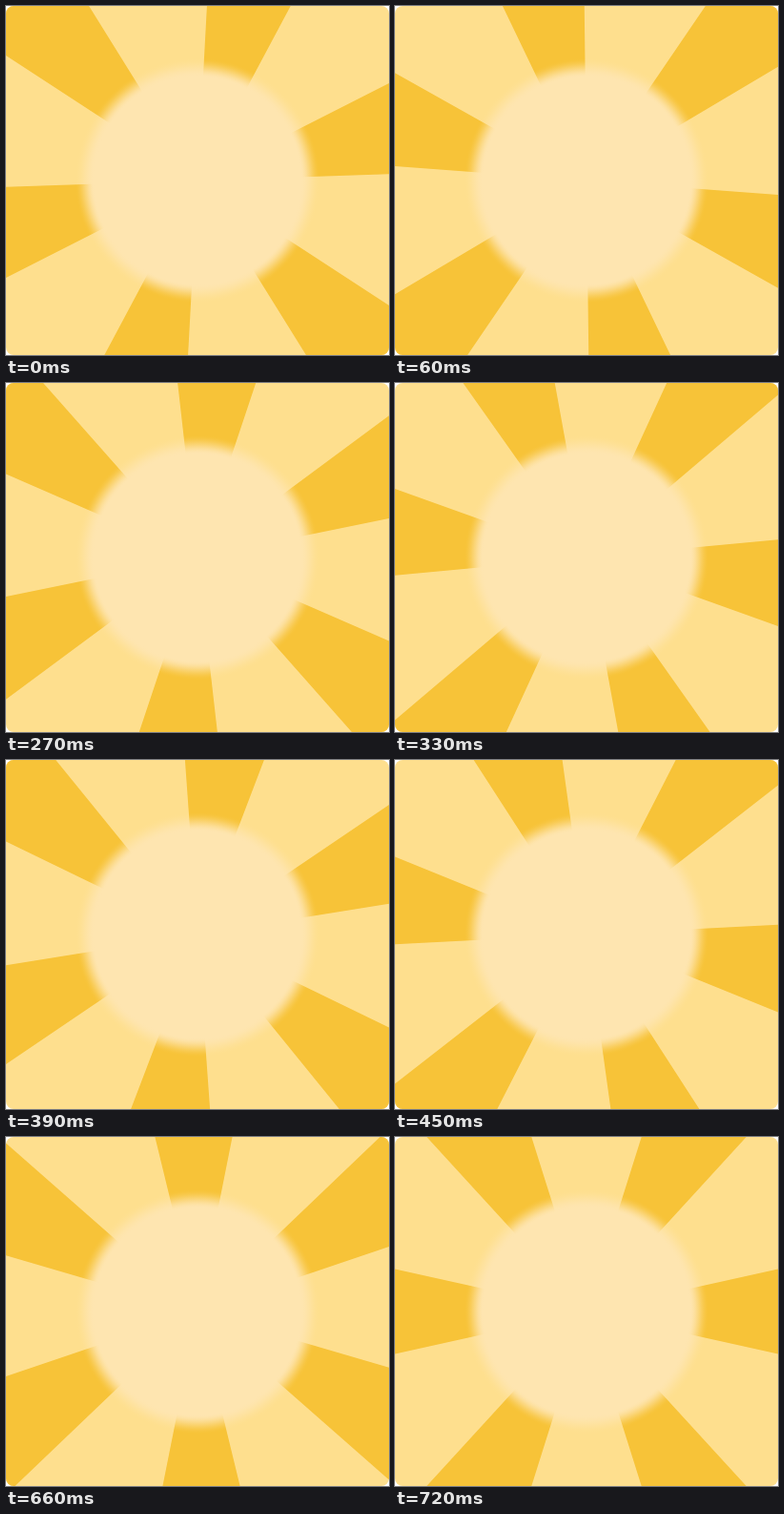
An HTML page with a canvas that plays this animation: 402x366 px, repeating every 750 ms.

```html
<!DOCTYPE html>
<html lang="en">
<head>
<meta charset="utf-8">
<title>Spinning sun rays</title>
<style>
  html, body { margin: 0; width: 100%; height: 100%; overflow: hidden; background: #fff; }
  canvas { display: block; }
</style>
</head>
<body>
<canvas id="stage" width="402" height="366"></canvas>
<script>
const ctx = document.getElementById("stage").getContext("2d");
const W = 402, H = 366, CX = W / 2, CY = H / 2;
const STEP_MS = 30, STEPS = 25, RAYS = 6;
const RAY_HALF = 12.5 * Math.PI / 180;
const DISC_RADIUS = 118.5, DISC_SOFTNESS = 10;

function softDisc() {
  const inner = DISC_RADIUS - DISC_SOFTNESS, outer = DISC_RADIUS + DISC_SOFTNESS;
  const gradient = ctx.createRadialGradient(CX, CY, inner, CX, CY, outer);
  for (let i = 0; i <= 16; i++) {
    const t = i / 16;
    const alpha = 1 - t * t * (3 - 2 * t);
    gradient.addColorStop(t, `rgba(254, 229, 176, ${alpha})`);
  }
  return gradient;
}

const disc = softDisc();

function draw(angle) {
  ctx.clearRect(0, 0, W, H);
  ctx.save();
  ctx.beginPath();
  ctx.roundRect(0, 0, W, H, 8);
  ctx.clip();

  ctx.fillStyle = "#fedf8e";
  ctx.fillRect(0, 0, W, H);

  ctx.fillStyle = "#f7c338";
  ctx.beginPath();
  for (let i = 0; i < RAYS; i++) {
    const middle = angle + i * 2 * Math.PI / RAYS;
    ctx.moveTo(CX, CY);
    ctx.arc(CX, CY, W, middle - RAY_HALF, middle + RAY_HALF);
    ctx.closePath();
  }
  ctx.fill();

  ctx.fillStyle = disc;
  ctx.fillRect(0, 0, W, H);
  ctx.restore();
}

// One full counter-clockwise turn per loop, in even steps.
function tick(now) {
  const step = Math.floor(now / STEP_MS) % STEPS;
  draw(-(step + 1) / STEPS * 2 * Math.PI);
  requestAnimationFrame(() => tick(performance.now() - start));
}

const start = performance.now();
tick(0);
</script>
</body>
</html>
```
